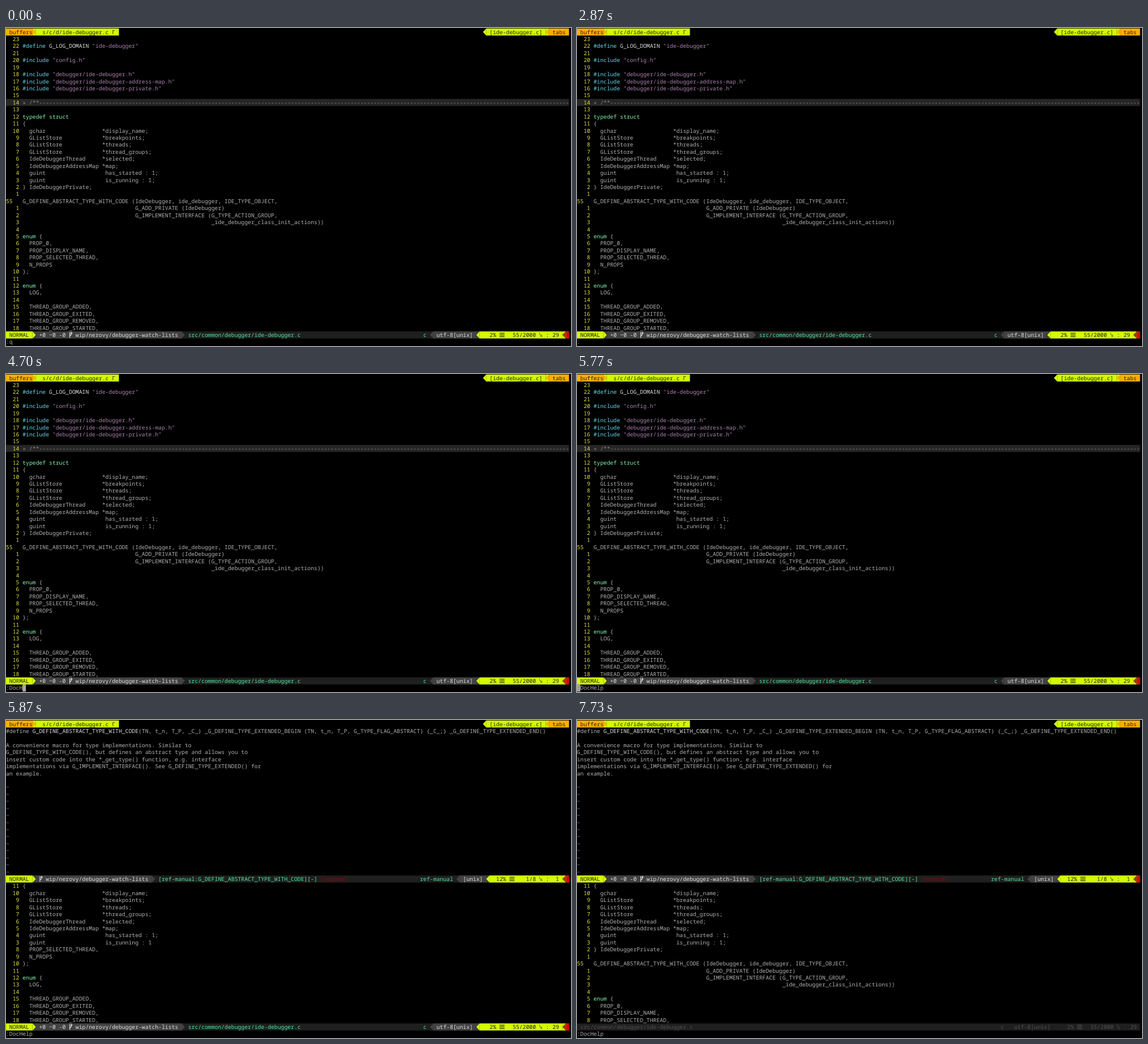
Recreate the animation shown at these times as an HTML page with a canvas. Size 998 by 561 pixels, loop 8000 ms.

```html
<!DOCTYPE html>
<html lang="en">
<head>
<meta charset="utf-8">
<title>Editor session</title>
<style>
html, body { margin: 0; width: 100%; height: 100%; overflow: hidden; background: #000; }
canvas { display: block; }
</style>
</head>
<body>
<canvas id="screen" width="998" height="561"></canvas>
<script>
const g = document.getElementById('screen').getContext('2d');
const CW = 5.85, RH = 12.43, TOP = 0.8, LOOP = 8000;
const FONT = '"Noto Sans Mono", "DejaVu Sans Mono", monospace';

const GREY = '#b0b0b0', WHITE = '#dedede', YELLOW = '#e2e23c', CYAN = '#62d8ee',
  MAUVE = '#ab82b0', MINT = '#86f5b2', LIME = '#d4fa00', ORANGE = '#ffaf00',
  MID = '#424242', DARK = '#1f1f1f', GREEN = '#4ee79c', BLUE = '#6c7fae', RED = '#8c0808';

const BRANCH = 'wip/nerovy/debugger-watch-lists';
const GIT = '+0 ~0 -0 ⎇ ' + BRANCH;
const PATH = 'src/common/debugger/ide-debugger.c';
const MACRO = 'G_DEFINE_ABSTRACT_TYPE_WITH_CODE';
const COMMAND = ':DocHelp';
const FOLD = 9, CURRENT = 23;

const code = `
#define G_LOG_DOMAIN "ide-debugger"

#include "config.h"

#include "debugger/ide-debugger.h"
#include "debugger/ide-debugger-address-map.h"
#include "debugger/ide-debugger-private.h"

» /**${'-'.repeat(160)}

typedef struct
{
  gchar                 *display_name;
  GListStore            *breakpoints;
  GListStore            *threads;
  GListStore            *thread_groups;
  IdeDebuggerThread     *selected;
  IdeDebuggerAddressMap *map;
  guint                  has_started : 1;
  guint                  is_running : 1;
} IdeDebuggerPrivate;

${MACRO} (IdeDebugger, ide_debugger, IDE_TYPE_OBJECT,
${' '.repeat(34)}G_ADD_PRIVATE (IdeDebugger)
${' '.repeat(34)}G_IMPLEMENT_INTERFACE (G_TYPE_ACTION_GROUP,
${' '.repeat(57)}_ide_debugger_class_init_actions))

enum {
  PROP_0,
  PROP_DISPLAY_NAME,
  PROP_SELECTED_THREAD,
  N_PROPS
};

enum {
  LOG,

  THREAD_GROUP_ADDED,
  THREAD_GROUP_EXITED,
  THREAD_GROUP_REMOVED,
  THREAD_GROUP_STARTED,`.split('\n');

const help = `

A convenience macro for type implementations. Similar to
G_DEFINE_TYPE_WITH_CODE(), but defines an abstract type and allows you to
insert custom code into the *_get_type() function, e.g. interface
implementations via G_IMPLEMENT_INTERFACE(). See G_DEFINE_TYPE_EXTENDED() for
an example.`.split('\n');

function fill(row, from, to, color) {
  g.fillStyle = color;
  g.fillRect(from * CW, row * RH + TOP, (to - from) * CW, RH);
}

// Powerline symbols, drawn inside one cell
const icons = {
  '☰'(x, y) {
    for (const dy of [-3.6, -0.6, 2.4]) g.fillRect(x, y + dy, 9, 1.2);
  },
  '␤'(x, y) {
    g.font = '5.5px ' + FONT;
    g.fillText('L', x, y);
    g.fillText('N', x + 2, y + 4);
  },
  '⎇'(x, y) {
    g.lineWidth = 1.2;
    g.beginPath();
    g.moveTo(x + 1.5, y - 5);
    g.lineTo(x + 1.5, y + 5);
    g.moveTo(x + 1.5, y + 2);
    g.lineTo(x + 4.5, y - 1);
    g.lineTo(x + 4.5, y - 4);
    g.moveTo(x + 3, y - 2.5);
    g.lineTo(x + 4.5, y - 4.5);
    g.lineTo(x + 6, y - 2.5);
    g.stroke();
  }
};

function put(row, col, text, color) {
  const y = row * RH + 7;
  g.fillStyle = g.strokeStyle = color;
  [...text].forEach((ch, i) => {
    const x = (col + i) * CW;
    g.font = '9.75px ' + FONT;
    if (icons[ch]) icons[ch](x, y);
    else if (ch !== ' ') g.fillText(ch, x, y + 3.5);
  });
}

// Section divider; dir 1 points right, -1 points left
function arrow(row, col, dir, color, back) {
  fill(row, col, col + 1, back);
  const base = (dir > 0 ? col : col + 1) * CW, y = row * RH + TOP;
  g.fillStyle = color;
  g.beginPath();
  g.moveTo(base, y);
  g.lineTo(base + dir * CW, y + RH / 2);
  g.lineTo(base, y + RH);
  g.fill();
}

function tabLine() {
  fill(0, 0, 8, ORANGE);
  put(0, 1, 'buffers', '#222');
  arrow(0, 8, 1, ORANGE, LIME);
  fill(0, 9, 34.1, LIME);
  put(0, 11, 's/c/d/ide-debugger.c Γ', '#222');
  arrow(0, 144, -1, LIME, '#000');
  fill(0, 145, 163, LIME);
  put(0, 146, '[ide-debugger.c]', '#222');
  arrow(0, 163, -1, ORANGE, LIME);
  fill(0, 164, 170, ORANGE);
  put(0, 165, 'tabs', '#222');
}

function status(row, git, name, type, enc, tail) {
  const gitEnd = 11 + git.length;
  const tailAt = 167 - tail.length, encAt = tailAt - 1 - enc.length;
  fill(row, 0, 170, DARK);
  fill(row, 0, 8, LIME);
  put(row, 1, 'NORMAL', '#222');
  arrow(row, 8, 1, LIME, MID);
  fill(row, 9, gitEnd, MID);
  put(row, 10, git, WHITE);
  arrow(row, gitEnd, 1, MID, DARK);
  put(row, gitEnd + 2, name, GREEN);
  put(row, encAt - 3 - type.length, type, GREEN);
  arrow(row, encAt - 2, -1, MID, DARK);
  fill(row, encAt - 1, tailAt, MID);
  put(row, encAt, enc, WHITE);
  arrow(row, tailAt, -1, LIME, MID);
  fill(row, tailAt + 1, 168, LIME);
  put(row, tailAt + 1, tail, '#222');
  arrow(row, 168, -1, '#a83000', LIME);
  arrow(row, 169, -1, '#e00000', '#a83000');
  return gitEnd + 2 + name.length;
}

function codeStatus() {
  status(43, GIT, PATH, 'c', 'utf-8[unix]', '   2% ☰   55/2000 ␤ : 29 ');
}

function dimStatus() {
  fill(43, 0, 170, DARK);
  const parts = [[1, PATH], [128, 'c'], [132, 'utf-8[unix]'], [148, '2% ☰   55/2000 ␤ : 29']];
  for (const [col, text] of parts) put(43, col, text, '#505050');
}

function codeLine(row, n, cut = 0) {
  const text = code[n].slice(0, code[n].length - cut);
  if (n === FOLD) fill(row, 0, 170, '#262626');
  put(row, 0, n === CURRENT ? '55' : String(Math.abs(n - CURRENT)).padStart(4), YELLOW);
  if (n === FOLD) return put(row, 5, text, '#8a8a8a');
  for (const m of text.matchAll(/#\w+|"[^"]*"|\w+|[^\w\s"#]+/g)) {
    const word = m[0];
    const color = word[0] === '#' ? CYAN : word[0] === '"' ? MAUVE
      : /^(typedef|struct|enum)$/.test(word) ? MINT
      : word === 'G_LOG_DOMAIN' ? WHITE : GREY;
    put(row, 5 + m.index, word, color);
  }
}

function helpWindow(git) {
  put(1, 0, '#define', GREY);
  put(1, 8, MACRO, WHITE);
  put(1, 40, '(TN, t_n, T_P, _C_) _G_DEFINE_TYPE_EXTENDED_BEGIN (TN, t_n, T_P, G_TYPE_FLAG_ABSTRACT) {_C_;} _G_DEFINE_TYPE_EXTENDED_END()', GREY);
  help.forEach((line, i) => put(i + 1, 0, line, GREY));
  for (let row = 9; row < 22; row++) put(row, 0, '~', BLUE);
  const end = status(22, git, `[ref-manual:${MACRO}][-]`, 'ref-manual', '[unix]', '  12% ☰    1/8 ␤ :  1 ');
  put(22, end + 1, '[noperm]', RED);
}

function cursor(row, col, ch) {
  fill(row, col, col + 1, '#aaa');
  put(row, col, ch, '#111');
}

const typed = [2270, 3200, 3400, 3600, 4430, 4730, 4930, 5130];
const ENTER = 5570, SPLIT = 5830, READY = 5930, BLINK = 600;
const lit = since => Math.floor(since / BLINK) % 2 === 0;

function draw(t) {
  g.fillStyle = '#000';
  g.fillRect(0, 0, 998, 561);
  tabLine();

  const split = t >= SPLIT, ready = t >= READY;
  if (split) helpWindow(ready ? GIT : '⎇ ' + BRANCH);
  for (let row = split ? 23 : 1; row < 43; row++) {
    // The lower window is repainted only down to row 31 at first
    const moved = split && (ready || row < 32);
    codeLine(row, row - (moved ? 11 : 1), moved && !ready && row === 31 ? 1 : 0);
  }
  ready ? dimStatus() : codeStatus();

  const count = typed.filter(at => t >= at).length;
  put(44, 0, count ? COMMAND.slice(0, count) : ':q', GREY);

  if (ready) {
    if (lit(t - READY)) cursor(1, 0, '#');
  } else if (t >= ENTER) {
    if (!split) cursor(44, 0, ':');
  } else if (count) {
    if (lit(t - typed[count - 1])) cursor(44, count, ' ');
  } else if (t >= 100 && lit(t - 100)) {
    cursor(24, 33, 'C');
  }
}

function tick(now) {
  draw(now % LOOP);
  requestAnimationFrame(tick);
}
g.textRendering = 'geometricPrecision';
requestAnimationFrame(tick);
</script>
</body>
</html>
```
